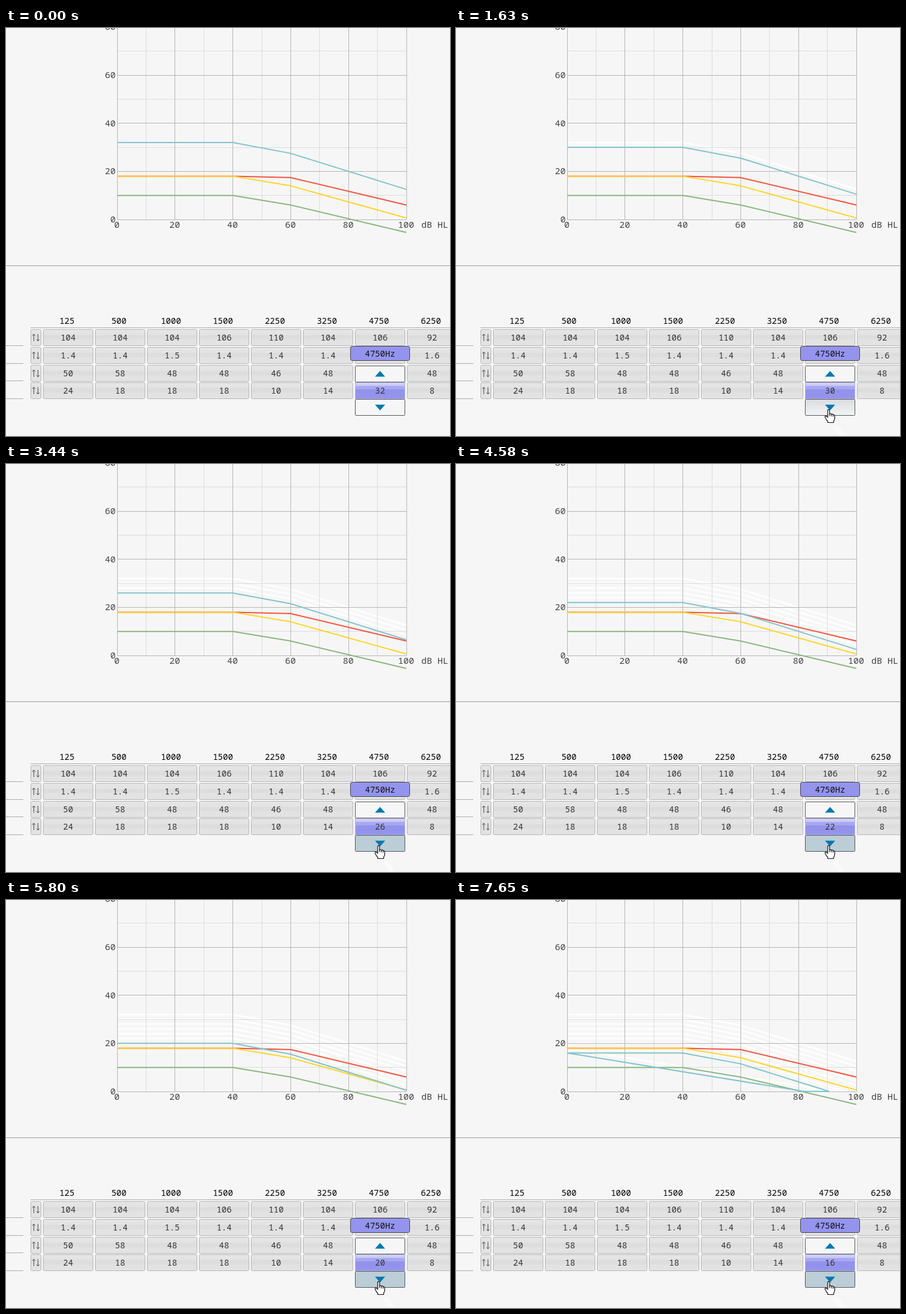
An HTML page for the animation above (8 s loop, 743 px wide and 684 px high).

```html
<!DOCTYPE html>
<html lang="en">
<head>
<meta charset="utf-8">
<title>Gain curve editor</title>
<style>
  html, body { margin: 0; width: 100%; height: 100%; overflow: hidden; background: #f6f6f6; }
  svg { display: block; width: 743px; height: 684px; }
  text { font: 14px "Noto Sans Mono", "DejaVu Sans Mono", monospace; fill: #333; text-anchor: middle; }
  .axis text { font-size: 15px; fill: #444; }
  .head text { fill: #000; }
  .minor { stroke: #dcdcdc; }
  .major { stroke: #b4b4b4; }
  .rule { stroke: #aaa; }
  .curve { fill: none; stroke-width: 2; }
  .ghost { fill: none; stroke: #fefefe; stroke-width: 3; }
  .cell { fill: url(#grey); stroke: #b5b5b5; }
  .icon { fill: none; stroke: #555; }
  .button { fill: #f6f6f6; stroke: #555; }
  .button.hover { fill: url(#hover); }
  .button.down { fill: #bbced7; }
  .tri { fill: #0078ae; }
</style>
</head>
<body>
<svg viewBox="0 0 743 684">
  <defs>
    <linearGradient id="grey" x2="0" y2="1">
      <stop offset="0" stop-color="#e6e6e6"/><stop offset=".36" stop-color="#e2e2e2"/>
      <stop offset=".36" stop-color="#dcdcdc"/><stop offset=".62" stop-color="#dedede"/>
      <stop offset=".62" stop-color="#e2e2e2"/><stop offset="1" stop-color="#e3e3e3"/>
    </linearGradient>
    <linearGradient id="violet" x2="0" y2="1">
      <stop offset="0" stop-color="#d0d0f6"/><stop offset=".2" stop-color="#c8c8f5"/>
      <stop offset=".2" stop-color="#ababf2"/><stop offset=".42" stop-color="#a5a5f0"/>
      <stop offset=".42" stop-color="#9292ec"/><stop offset="1" stop-color="#9494ed"/>
    </linearGradient>
    <linearGradient id="hover" x2="0" y2="1">
      <stop offset="0" stop-color="#d9dce0"/><stop offset="1" stop-color="#f4f4f4"/>
    </linearGradient>
    <clipPath id="plot"><path d="M185 0H671V322H185Z"/></clipPath>
  </defs>
  <g id="ghosts"></g>
  <g id="grid"></g>
  <g id="axis" class="axis"></g>
  <g id="curves"></g>
  <path id="active" class="curve" stroke="#82c3cc"/>
  <path d="M0 398.5H743" stroke="#999"/>
  <path class="rule" d="M0 532.5H29M0 562.5H29M0 591.5H29M0 621.5H29M41 502.5H743"/>
  <g id="head" class="head"></g>
  <g id="table"></g>
  <rect x="576.5" y="533.5" width="99" height="24" rx="3" fill="#9494ee" stroke="#444"/>
  <text x="626" y="551" style="fill:#111">4750Hz</text>
  <rect class="button" x="584.5" y="566.5" width="83" height="27" rx="1"/>
  <path class="tri" d="M617.5 584.5L626 575L634.5 584.5Z"/>
  <rect x="584.5" y="594.5" width="83" height="27" fill="url(#violet)" stroke="#b4b4ec"/>
  <text id="value" x="626" y="613"></text>
  <rect id="down" class="button" x="584.5" y="622.5" width="83" height="27" rx="1"/>
  <path class="tri" d="M617.5 631.5L626 641L634.5 631.5Z"/>
  <path id="trail" d="M634 667L647 683" stroke="#fafafa" stroke-width="9"/>
  <path id="hand" fill="#fff" stroke="#111" stroke-width="1.2" stroke-linejoin="round"
    d="M-1.5 1.2Q0-.8 1.6 1.2V7.6Q3.4 6 4.6 8Q6.6 6.8 7.6 9Q10 8.2 10.2 11V15Q10 18 8.4 19.5V22H-1.4V20Q-4 17-5.8 13.2Q-6.4 10.6-4 11L-1.5 13.4ZM1.6 7.6V11M4.6 8V11.4M7.6 9V12"/>
</svg>
<script>
const $ = id => document.getElementById(id);
const px = d => 186 + 4.84 * d;
const py = v => 321 - 4.0325 * v;
const text = (x, y, s, extra = '') => `<text x="${x}" y="${y}" ${extra}>${s}</text>`;
const levels = [0, 40, 60, 100];
const line = vals => 'M' + vals.map((v, i) => `${px(levels[i])} ${py(v)}`).join('L');

// A curve that drops below zero closes on itself and is cut at the baseline.
function gainPath(v) {
  const end = v - 19.5;
  if (end >= 0) return line([v, v, v - 4.5, end]);
  const cross = 60 + 40 * (v - 4.5) / 15;
  const back = 100 * v / 19.5;
  return line([v, v, v - 4.5]) + `L${px(cross)} 321H${px(back)}Z`;
}

function drawPlot() {
  let minor = '', major = '', labels = '';
  for (let i = 0; i <= 10; i++) {
    const x = Math.floor(px(i * 10)) + .5, y = Math.floor(py(i * 10)) + .5;
    const d = `M${x} 0V321` + (y > 0 ? `M186 ${y}H670` : '');
    if (i % 2) { minor += d; continue; }
    major += d;
    labels += text(px(i * 10) - .5, 335, i * 10);
    labels += text(183.5, Math.round(py(i * 10)) + 5, i * 10, 'style="text-anchor:end"');
  }
  $('grid').innerHTML = `<path class="minor" d="${minor}"/><path class="major" d="${major}"/>`;
  $('axis').innerHTML = labels + text(695, 335, 'dB HL', 'style="text-anchor:start"');
  $('curves').innerHTML = [
    ['#88b77b', [10, 10, 6, -5.4]],
    ['#f4523f', [18, 18, 17.4, 6]],
    ['#ffd52e', [18, 18, 14, .6]]
  ].map(([c, vals]) => `<path class="curve" stroke="${c}" d="${line(vals)}"/>`).join('');
}

function drawTable() {
  const heads = [125, 500, 1000, 1500, 2250, 3250, 4750, 6250];
  const rows = [
    [505, [104, 104, 104, 106, 110, 104, 106, 92]],
    [535, [1.4, 1.4, 1.5, 1.4, 1.4, 1.4, 1.4, 1.6]],
    [565, [50, 58, 48, 48, 46, 48, '', 48]],
    [594, [24, 18, 18, 18, 10, 14, '', 8]]
  ];
  const cell = (x, y, w) =>
    `<rect class="cell" x="${x + .5}" y="${y + .5}" width="${w}" height="27" rx="2"/>`;
  $('head').innerHTML = heads.map((h, i) => text(102 + 87 * i, 496, h)).join('');
  $('table').innerHTML = rows.map(([y, vals]) =>
    cell(41, y, 17) +
    `<path class="icon" d="M46.5 ${y + 20}V${y + 8}m-2.5 3l2.5-3l2.5 3M53.5 ${y + 8}V${y + 20}m-2.5-3l2.5 3l2.5-3"/>` +
    vals.map((v, i) => v === '' ? '' : cell(62 + 87 * i, y, 83) + text(104 + 87 * i, y + 19, v)).join('')
  ).join('');
}

const LOOP = 8000, START = 32, STEP = 2;
const drops = [1170, 2160, 2990, 3830, 4580, 5430, 6260, 7260];
const releases = [[1630, 1770], [2470, 2610], [3300, 3440], [4060, 4200],
                  [4820, 4970], [5660, 5800], [6720, 6880], [7500, 7650]];

drawPlot();
drawTable();
$('ghosts').innerHTML = drops.map((_, i) =>
  `<path class="ghost" d="${gainPath(START - STEP * i)}"/>`).join('');
const ghosts = [...$('ghosts').children];

function frame() {
  const t = performance.now() % LOOP;
  const n = drops.filter(d => t >= d).length;
  const v = START - STEP * n;
  $('value').textContent = v;
  $('active').setAttribute('d', gainPath(v));
  ghosts.forEach((g, i) => g.style.display = i < n ? '' : 'none');

  // The pointer arrives in 70 ms steps, slowing towards the button.
  const step = Math.min(6, Math.floor((t - 60) / 70));
  const left = (1 - step / 6) ** 2;
  const y = 639.5 + 38 * left;
  const shown = t >= 60;
  $('hand').style.display = shown ? '' : 'none';
  $('trail').style.display = t >= 340 ? '' : 'none';
  $('hand').setAttribute('transform', `translate(${623.5 + 25 * left} ${y})`);

  const released = releases.some(([a, b]) => t >= a && t < b);
  const state = !shown || y > 650 ? '' : t < 550 || released ? ' hover' : ' down';
  $('down').setAttribute('class', 'button' + state);
  requestAnimationFrame(frame);
}
frame();
</script>
</body>
</html>
```
